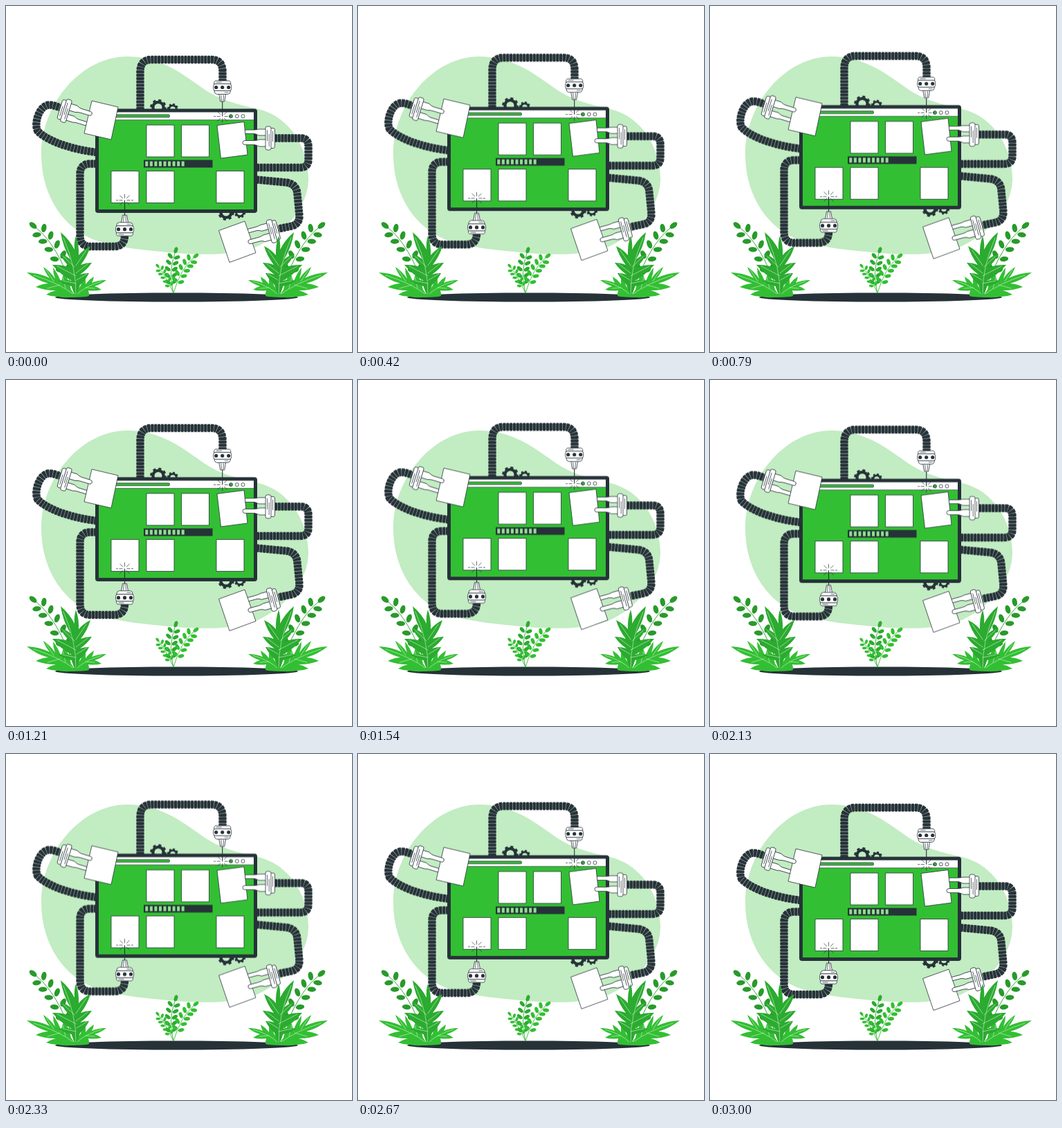
An HTML page for the animation above (3040 ms loop, 500x500 px).

```html
<!DOCTYPE html>
<html lang="en">
<head>
<meta charset="utf-8">
<title>Robotic page builder</title>
<style>
  html, body { margin: 0; width: 100%; height: 100%; overflow: hidden; background: #fff; }
  svg { display: block; width: 100%; height: 100%; }
  .dark { fill: #263238; }
  .green { fill: #33bf33; }
  .deep { fill: #2bab2f; }
  .line { fill: #fff; stroke: #263238; stroke-width: .8; stroke-linejoin: round; }
  .thin { fill: none; stroke: #263238; stroke-width: .7; }
  .beam { stroke: #263238; stroke-width: 1.1; }
  .vein { fill: none; stroke: #d9f3d9; stroke-width: .6; stroke-linecap: round; }
  .tube { fill: none; stroke: #263238; stroke-width: 9; }
  .ribs { fill: none; stroke: #263238; stroke-width: 11.4; stroke-dasharray: 3.8 1; }
  .gaps { fill: none; stroke: #a9b8b0; stroke-width: 8.6; stroke-dasharray: .6 4.2; stroke-dashoffset: -4; }
  .float { animation: float 3040ms linear infinite; }
  /* 1.5 s up, 1.5 s down, then a 40 ms rest */
  @keyframes float {
    0%, 98.684%, 100% { transform: translateY(0); }
    49.342% { transform: translateY(-10px); }
  }
</style>
</head>
<body>
<svg viewBox="0 0 500 500">
  <defs>
    <g id="head">
      <path class="beam" d="M0 20V42"/>
      <path class="line" d="M-5 9.5H5L3 20.5H-3Z"/>
      <path class="thin" d="M-2 11L-1.2 20M2 11L1.2 20"/>
      <path class="line" d="M-9.5 -9.5H9.5Q12 -9.5 12.2 -5H-12.2Q-12 -9.5 -9.5 -9.5Z"/>
      <path class="line" d="M-12 5H12Q11 10 8 10H-8Q-11 10 -12 5Z"/>
      <rect class="line" x="-13" y="-5" width="26" height="10" rx="3"/>
      <path class="thin" d="M-9 -7.3H-1M3 7.4H9"/>
      <g class="dark"><circle cx="-9" r="2.6"/><circle r="2.6"/><circle cx="9" r="2.6"/></g>
      <path class="thin" d="M-12.5 42H-9.5M-8 42H-3M3 42H8M9.5 42H12.5M0 45V51M-2.5 39.5L-7 35M2.5 39.5L7 35M-2.5 44.5L-7 49M2.5 44.5L7 49"/>
    </g>
    <path id="thumb" class="line" d="M-5 -13H-16Q-19 -12 -22 -12H-35Q-38 -9.3 -35 -6.5H-22Q-19 -6 -16 -4H-5Z"/>
    <g id="palm">
      <path class="line" d="M-5 2H-15Q-19 3.500 -23 3.500H-36Q-39 3.500 -39 6.500Q-39 9.500 -36 9.500H-22Q-18 10 -15 12H-5Z"/>
      <rect class="line" x="-1" y="-14.500" width="8.500" height="29" rx="2.500"/>
      <rect class="line" x="-6" y="-17" width="8" height="34" rx="2.500"/>
      <path class="thin" d="M-3.400 -12V4M-.8 -6V12M4.600 -10V5"/>
    </g>
    <g id="bush"></g>
  </defs>

  <path fill="#c2ecc2" d="M175 73C222 73 252 96 283 118C310 137 335 142 365 149C410 160 437 205 437 250C437 290 402 328 368 345C340 359 295 360 260 358C210 354 160 350 125 337C75 315 51 265 51 215C51 140 110 73 175 73Z"/>
  <ellipse class="dark" cx="246.500" cy="421" rx="175.500" ry="6.500"/>

  <g class="float">
    <g id="gears"></g>
    <g id="hoses"></g>

    <rect class="dark" x="129" y="148.500" width="234" height="150.500" rx="4"/>
    <rect x="134" y="153.500" width="224" height="140.500" fill="#fff"/>
    <rect class="green" x="134" y="165" width="224" height="129"/>
    <path class="thin" d="M134 164.600H358"/>
    <rect class="green" x="148" y="157" width="88.500" height="3.800" rx="1.500" stroke="#263238" stroke-width=".8"/>
    <circle class="green" cx="325" cy="159.300" r="2.500" stroke="#263238" stroke-width=".8"/>
    <circle class="line" cx="333.800" cy="159.300" r="2.500"/>
    <circle class="line" cx="342.400" cy="159.300" r="2.500"/>

    <path class="line" d="M203 172h40v46h-40zM253.500 172h40v46h-40zM152 238.500h40v46h-40zM203 238.500h40v46h-40zM304 238.500h40v46h-40z"/>
    <rect class="dark" x="199" y="222.500" width="99.500" height="11"/>
    <path d="M201.300 228H258" stroke="#91de91" stroke-width="7" stroke-dasharray="4 2.550"/>

    <use href="#head" transform="translate(312.700 117.500)"/>
    <use href="#head" transform="translate(171.500 322.700) scale(1 -1)"/>

    <g id="hands"></g>
  </g>

  <g id="sprout"></g>
  <use href="#bush"/>
  <use href="#bush" transform="translate(495 0) scale(-1 1)"/>
</svg>
<script>
  const put = (id, markup) => { document.getElementById(id).innerHTML += markup; };

  // Ribbed hoses
  [
    'M194 150V95Q194 77.500 210 77.500H297Q313 77.500 313 95V108',
    'M131 211.500C100 208 62 197 46 181C40 172 47 143 63 143C68 143 73 145 78 147',
    'M131 228H122Q107 228 107 243V332Q107 347.500 122 347.500H156Q171.500 347.500 171.500 332',
    'M388 191H426Q437 191 437 203V222Q437 233.500 425 233.500H362',
    'M362 251L405 255Q420 257 421 272L424 303Q424 315 413 318L394 322'
  ].forEach(d => put('hoses', ['tube', 'ribs', 'gaps'].map(c => `<path class="${c}" d="${d}"/>`).join('')));

  function gear(x, y, r, teeth) {
    const step = 2 * Math.PI * r / teeth;
    const ring = extra => `<circle cx="${x}" cy="${y}" fill="none" stroke="#263238" ${extra}/>`;
    put('gears', ring(`r="${r * .78}" stroke-width="${r * .44}"`) +
      ring(`r="${r}" stroke-width="${r * .42}" stroke-dasharray="${step * .5} ${step * .5}"`));
  }
  gear(220, 146.5, 9.8, 8);
  gear(241, 149, 6.8, 8);
  gear(318, 298, 9.8, 8);
  gear(338, 298.5, 6.8, 8);

  // Each hand pinches a card between thumb and palm
  function hand(x, y, turn, card) {
    const at = `transform="translate(${x} ${y}) rotate(${turn})"`;
    put('hands', `<use href="#thumb" ${at}/><path class="line" d="M${card}Z"/><use href="#palm" ${at}/>`);
  }
  hand(85, 151, 197, '124 137L162 146L152 193L113 184');
  hand(381, 191, 0, '305 172.500L344 167.500L349 215L310.500 220');
  hand(386, 325, -15, '307.500 324.500L345 311L361 356.500L323 370.500');

  // Outline through alternating lobe tips and notches, each edge bowed outward
  function lobed(points, bow) {
    const p = points.split(' ').map(s => s.split(',').map(Number));
    return p.reduce((d, [x, y], i) => {
      if (!i) return `M${x} ${y}`;
      const [px, py] = p[i - 1];
      const cx = (x + px) / 2 + (y - py) * bow, cy = (y + py) / 2 - (x - px) * bow;
      return `${d}Q${cx} ${cy} ${x} ${y}`;
    }, '') + 'Z';
  }

  // Curved stem with leaf pairs and one leaf at the tip
  function sprig(id, [x0, y0, cx, cy, x1, y1], pairs, len, color) {
    const leaf = (x, y, a, gap) => `<ellipse cx="${gap + len / 2}" rx="${len / 2}" ry="${len * .29}"
      fill="${color}" transform="translate(${x} ${y}) rotate(${a})"/>`;
    let out = `<path d="M${x0} ${y0}Q${cx} ${cy} ${x1} ${y1}" fill="none" stroke="${color}" stroke-width=".9"/>`;
    for (let i = 0; i <= pairs; i++) {
      const t = .22 + .78 * i / pairs, u = 1 - t;
      const x = u * u * x0 + 2 * u * t * cx + t * t * x1;
      const y = u * u * y0 + 2 * u * t * cy + t * t * y1;
      const a = Math.atan2(u * (cy - y0) + t * (y1 - cy), u * (cx - x0) + t * (x1 - cx)) * 180 / Math.PI;
      out += i < pairs ? leaf(x, y, a - 54, len * .2) + leaf(x, y, a + 54, len * .2) : leaf(x, y, a, 0);
    }
    put(id, out);
  }

  sprig('bush', [97, 410, 74, 345, 44, 321], 5, 12.5, '#289a2b');
  const low = lobed('101,420 75,420 58,417 72,411 43,406 61,401 30,385 63,393 54,377 71,394 68,378 80,401 84,385 94,410', .1);
  const side = lobed('99,420 108,404 114,389 115,402 127,391 124,400 145,396 128,405 138,410 119,411 120,419', .1);
  const tall = lobed('101,420 95,405 75,397 95,397 67,374 93,378 78,358 93,366 79,327 99,352 101,332 105,360 122,347 108,374 124,371 107,388 120,386 107,403', .1);
  put('bush', `<path class="green" d="${low}"/><path class="green" d="${side}"/>
    <path class="vein" d="M100 418Q76 400 40 389M78 403L60 408M69 398L58 381M86 408L82 392M102 417Q114 405 138 398M115 407L128 408"/>
    <path class="deep" d="${tall}"/>
    <path class="vein" d="M101 418Q102 378 83 335M101 401L82 397M101 390L74 376M99 377L83 362M102 396L117 387M101 386L118 373M101 375L116 353"/>
    <ellipse class="green" cx="97" cy="418.500" rx="23" ry="2.500"/>`);

  sprig('sprout', [242, 415, 234, 385, 244, 357], 5, 9, '#2bab2f');
  sprig('sprout', [242, 415, 232, 392, 221, 378], 5, 6.5, '#33bf33');
  sprig('sprout', [242, 415, 252, 380, 271, 364], 5, 9, '#33bf33');
</script>
</body>
</html>
```
